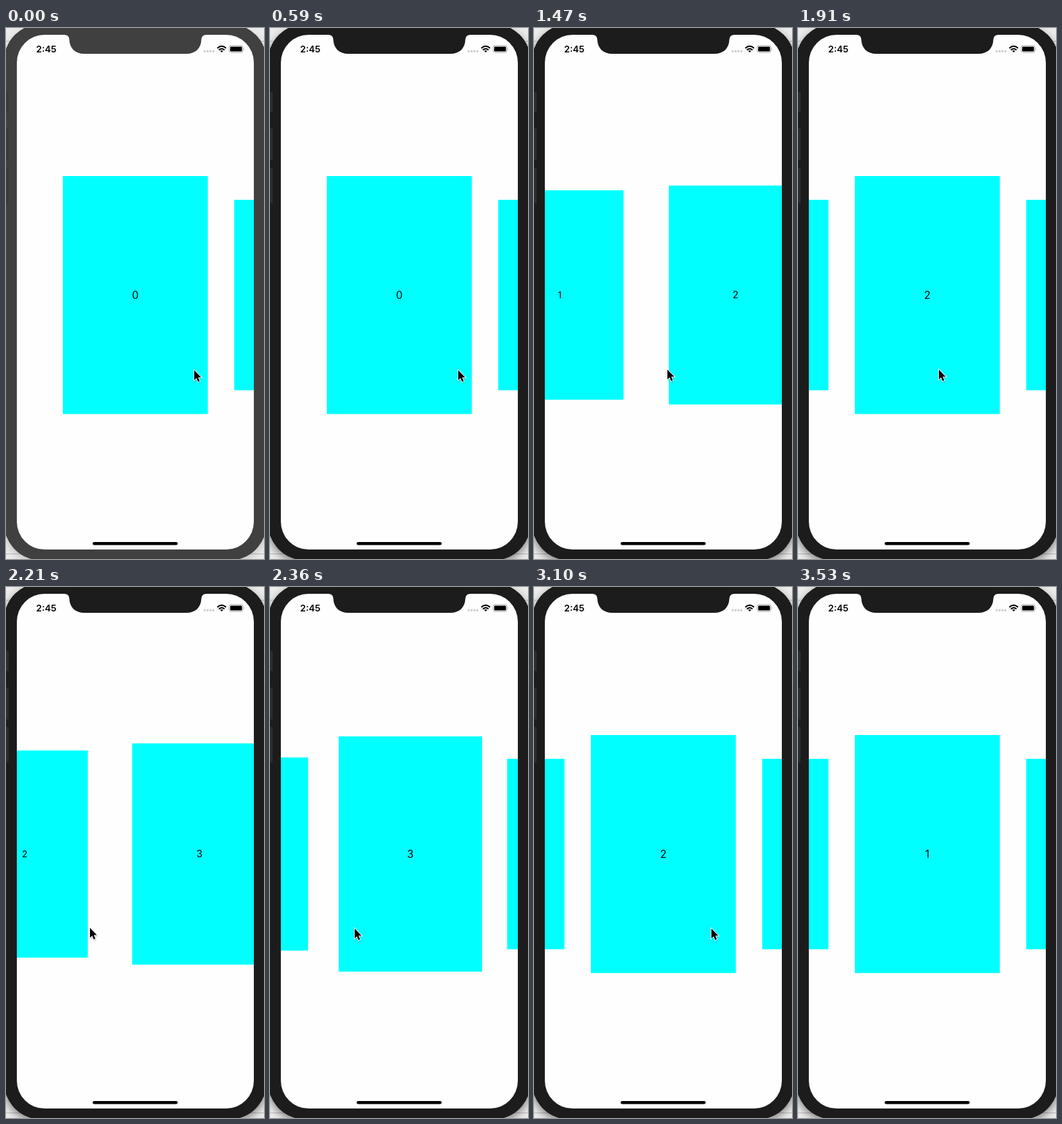
Animation, 381 px wide and 782 px high, one loop 3.98 s. Source, as an HTML page:

```html
<!DOCTYPE html>
<html lang="en">
<head>
<meta charset="utf-8">
<title>Card carousel</title>
<style>
  html, body { margin: 0; width: 100%; height: 100%; overflow: hidden; background: #e6e6e6; }
  svg { display: block; width: 381px; height: 782px; }
  text { font-family: Inter, "Liberation Sans", sans-serif; text-anchor: middle; }
  #body { fill: #1c1c1c; }
  #keys { fill: #2c2c2c; }
  #shade { opacity: .5; }
  .idle #body, .idle #notch { fill: #404040; }
  #notch { fill: #1c1c1c; }
  .idle #keys { fill: #393939; }
  .idle #shade { opacity: .2; }
</style>
</head>
<body>
<svg id="stage" viewBox="0 0 381 782" xmlns="http://www.w3.org/2000/svg">
  <defs>
    <clipPath id="screen"><rect x="16" y="10" width="350" height="758" rx="41"/></clipPath>
    <filter id="soft" x="-10%" y="-10%" width="120%" height="120%"><feGaussianBlur stdDeviation="7"/></filter>
    <filter id="drop" x="-50%" y="-50%" width="200%" height="200%"><feGaussianBlur stdDeviation="0.9"/></filter>
  </defs>

  <rect width="381" height="782" fill="#ececec"/>
  <path d="M0 19.5H381M0 774.5H381" stroke="#bdbdbd"/>
  <rect id="shade" x="-3" y="0" width="388" height="788" rx="55" filter="url(#soft)"/>
  <rect id="body" x="-3" y="-6" width="388" height="790" rx="55"/>
  <g id="keys">
    <rect y="94" width="4" height="30"/>
    <rect y="148" width="4" height="47"/>
    <rect y="206" width="4" height="52"/>
  </g>

  <g clip-path="url(#screen)">
    <rect x="16" y="10" width="350" height="758" fill="#fefefe"/>
    <g id="cards"></g>
    <rect x="128" y="757" width="125.5" height="4.4" rx="2.2"/>
  </g>
  <path id="notch" d="M84 9V10H86Q93 10 93.500 17C94 30 102 38 116 38H266C280 38 288 30 288.500 17Q289 10 296 10H298V9Z"/>

  <text x="59.600" y="36" font-size="13.500" font-weight="600">2:45</text>
  <g fill="#cbcbcb">
    <circle cx="293.500" cy="34.200" r="1.600"/><circle cx="297.700" cy="34.200" r="1.600"/>
    <circle cx="301.900" cy="34.200" r="1.600"/><circle cx="306.100" cy="34.200" r="1.600"/>
  </g>
  <g fill="none" stroke="#000" stroke-width="2">
    <path d="M312 29.800Q318.500 23.800 325 29.800M314.400 32.400Q318.500 28.600 322.600 32.400"/>
    <path d="M316.300 33.800Q318.500 32 320.700 33.800L318.500 36Z" fill="#000" stroke="none"/>
  </g>
  <rect x="329.500" y="26" width="20.500" height="10" rx="2.600" fill="none" stroke="#a6a6a6"/>
  <rect x="331" y="27.400" width="17.500" height="7.200" rx="1.400"/>
  <path d="M351 29.300Q352.600 31 351 32.700Z" fill="#a6a6a6"/>

  <g id="cursor">
    <path d="M1 1V16L4.500 13L7 18.500L9.200 17.500L6.800 12H11.500Z" opacity=".35" filter="url(#drop)" transform="translate(.5 1.500)"/>
    <path d="M1 1V15.500L4.300 12.500L6.700 18L9 17L6.700 11.600H11.200Z" stroke="#fff" stroke-width="1.800" paint-order="stroke"/>
  </g>
</svg>

<script>
const LOOP = 3980, WAKE = 590;
const CENTER = { x: 191, y: 393.25 };
const CARD = { w: 214, h: 350.5 };
const PITCH = 289.6, SHRINK = 0.2;

// [start ms, carousel page, cursor x, cursor y]
const steps = [
  [0, 0, 277, 503],
  [740, 0, 250, 503],
  [890, 0.8, 140, 502],
  [1030, 1, 95, 501],
  [1180, 1, 222, 501],
  [1330, 1, 249, 502],
  [1470, 1.6, 196, 502],
  [1620, 1.94, 172, 502],
  [1770, 2, 176, 502],
  [1910, 2, 207, 502],
  [2060, 2.114, 180, 502],
  [2210, 2.648, 123, 501],
  [2360, 2.943, 124, 502],
  [2510, 3, 238, 502],
  [2650, 2.37, 308, 501],
  [2800, 2, 285, 503],
  [2950, 2, 235, 502],
  [3100, 2, 261, 502],
  [3240, 1.25, 335, 520],
  [3380, 1.017, 356, 761],
  [3530, 1, null, null]
];

const stage = document.getElementById('stage');
const cursor = document.getElementById('cursor');
const deck = document.getElementById('cards');

function add(parent, tag, attrs, label) {
  const el = document.createElementNS('http://www.w3.org/2000/svg', tag);
  for (const key in attrs) el.setAttribute(key, attrs[key]);
  if (label !== undefined) el.textContent = label;
  return parent.appendChild(el);
}

const cards = Array.from({ length: 5 }, (_, i) => {
  const card = add(deck, 'g', {});
  add(card, 'rect', { x: -CARD.w / 2, y: -CARD.h / 2, width: CARD.w, height: CARD.h, fill: '#0ff' });
  add(card, 'text', { x: 0, y: 5.6, 'font-size': 15.5 }, i);
  return card;
});

// Cards shrink with distance from the middle, and their offset shrinks with them.
function place(card, offset) {
  const scale = 1 - SHRINK * Math.min(1, Math.abs(offset));
  const x = CENTER.x + offset * PITCH * scale;
  card.setAttribute('transform', `translate(${x} ${CENTER.y}) scale(${scale})`);
}

function draw(t) {
  const [, page, x, y] = steps.filter(step => step[0] <= t).pop();
  stage.classList.toggle('idle', t < WAKE);
  cards.forEach((card, i) => place(card, i - page));
  cursor.style.display = x === null ? 'none' : '';
  if (x !== null) cursor.setAttribute('transform', `translate(${x} ${y})`);
}

const begin = performance.now();
function tick(now) {
  draw(Math.max(0, now - begin) % LOOP);
  requestAnimationFrame(tick);
}
draw(0);
requestAnimationFrame(tick);
</script>
</body>
</html>
```
